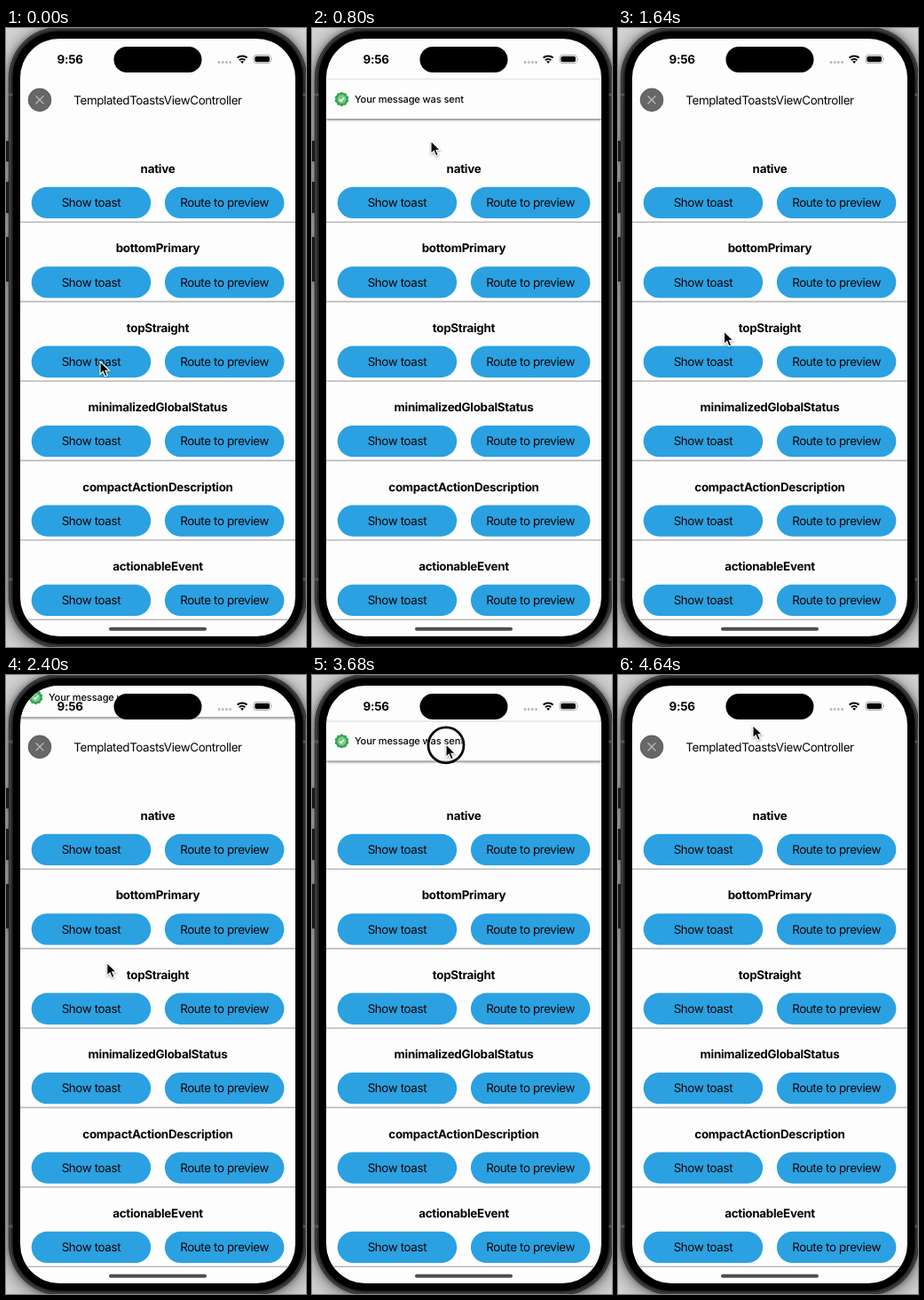
Animation of 338 by 696 pixels, one loop 4680 ms. Source, as an HTML page:

```html
<!DOCTYPE html>
<html lang="en">
<head>
<meta charset="utf-8">
<title>Toast demo</title>
<style>
html, body { margin: 0; width: 100%; height: 100%; overflow: hidden; background: #d4d4d4; }
svg { display: block; width: 338px; height: 696px; }
text { font: 13.4px Inter, sans-serif; letter-spacing: -.029em; fill: #050505; text-rendering: geometricPrecision; }
.mid { text-anchor: middle; }
.bold { font-weight: 700; letter-spacing: -.02em; }
#toast text { font-size: 11.05px; font-weight: 500; letter-spacing: -.01em; }
#toast .panel { filter: drop-shadow(0 1.4px 1.4px rgba(0, 0, 0, .66)); }
.phone { filter: drop-shadow(0 0 3px rgba(0, 0, 0, .45)) drop-shadow(0 3px 11px rgba(0, 0, 0, .5)); }
</style>
</head>
<body>
<svg viewBox="0 0 338 696">
  <defs>
    <clipPath id="screen"><rect x="16" y="12" width="310" height="672" rx="44"/></clipPath>
  </defs>

  <g class="phone">
    <path d="M0 127h5v23h-5zM0 173h5v35h-5zM0 235h5v50h-5z" fill="#1b1b1c"/>
    <rect x="3" y="-1" width="336" height="698" rx="57" fill="#2b2b2d"/>
  </g>
  <rect x="4.5" y=".5" width="333" height="695" rx="55" fill="none" stroke="#4c4d4f"/>
  <path d="M3 75h5M334 75h4M3 620h5M334 620h4" stroke="#555" stroke-width="3"/>
  <rect x="7.5" y="3.5" width="327" height="689" rx="52" fill="#000"/>

  <g clip-path="url(#screen)">
    <rect x="16" y="12" width="310" height="672" fill="#fdfdfd"/>
    <circle cx="38" cy="80.8" r="12.8" fill="#676767" stroke="#585858"/>
    <path d="M33.9 76.7l8.2 8.2m0-8.2l-8.2 8.2" stroke="#c4c4c4" stroke-width="1.2" stroke-linecap="round"/>
    <text class="mid" x="171" y="85.7">TemplatedToastsViewController</text>
    <g id="rows"></g>
    <rect x="116" y="673.8" width="110" height="4" rx="2" fill="#4e4e4e"/>

    <g id="toast">
      <rect class="panel" x="16" y="58" width="310" height="44" fill="#fdfdfd"/>
      <path id="seal" fill="#37a550"/>
      <circle cx="33.5" cy="80" r="4.9" fill="#7cca8b"/>
      <path d="M31 80.2l1.9 1.9 3.3-3.9" fill="none" stroke="#fff" stroke-width="1.4"/>
      <text x="48" y="84">Your message was sent</text>
    </g>

    <text class="bold" x="57.6" y="39.8">9:56</text>
    <rect x="121.5" y="21" width="99" height="29" rx="14.5" fill="#000"/>
    <path d="M240 38.5h14" stroke="#b9b9b9" stroke-width="3" stroke-linecap="round" stroke-dasharray="0 4.2"/>
    <g fill="none" stroke="#050505" stroke-width="2">
      <path d="M260.6 33.6a8 8 0 0 1 11 0M262.9 36.2a4.8 4.8 0 0 1 6.4 0"/>
      <path d="M266.1 39.9l-1.9-2.1a2.8 2.8 0 0 1 3.8 0z" fill="#050505" stroke="none"/>
    </g>
    <rect x="279" y="30.3" width="19.4" height="9.4" rx="3" fill="none" stroke="#a5a5a5" stroke-width=".9"/>
    <rect x="280.4" y="31.7" width="16.6" height="6.6" rx="1.8" fill="#050505"/>
    <path d="M299.5 33.5q1.6 1.5 0 3z" fill="#a5a5a5"/>
  </g>

  <g id="cursor">
    <g id="ring" fill="none">
      <circle r="20" stroke="#fff" stroke-opacity=".7" stroke-width="4"/>
      <circle r="20" stroke="#050505" stroke-width="2.8"/>
    </g>
    <path d="M0-1v14.4l3.3-3.1 2.3 5.5 2.7-1.1-2.3-5.4h4.6z" fill="#050505" stroke="#fff" stroke-width="1.1"
      style="filter:drop-shadow(0 1px 1px rgba(0,0,0,.35))"/>
  </g>
</svg>
<script>
const LOOP = 4680;
const $ = id => document.getElementById(id);

const names = ['native', 'bottomPrimary', 'topStraight', 'minimalizedGlobalStatus',
  'compactActionDescription', 'actionableEvent'];
const button = (x, label) =>
  `<rect x="${x}" y="178.8" width="134.5" height="35.3" rx="17.6" fill="#2ba1e1"/>
   <text class="mid" x="${x + 67.2}" y="201.3">${label}</text>`;
$('rows').innerHTML = names.map((name, i) =>
  `<g transform="translate(0 ${i * 89.4})">
    <text class="mid bold" x="171" y="163">${name}</text>
    ${button(28.7, 'Show toast')}${button(178.9, 'Route to preview')}
    <path d="M16 218.2h310" stroke="#b9b9bb" stroke-width="1.6"/>
  </g>`).join('');

// Scalloped badge outline
$('seal').setAttribute('d', 'M' + Array.from({ length: 72 }, (_, i) => {
  const a = i * Math.PI / 36, r = 7.6 + .5 * Math.cos(10 * a);
  return `${(33.5 + r * Math.sin(a)).toFixed(2)} ${(80 - r * Math.cos(a)).toFixed(2)}`;
}).join('L') + 'z');

const linear = p => p;
const smooth = p => p * p * (3 - 2 * p);
const easeOut = p => 1 - (1 - p) ** 3;
const easeIn = p => p * p;

// Keys are [time, value, easing towards this key]
function track(keys, t) {
  const i = keys.findIndex(k => k[0] > t);
  if (i < 0) return keys[keys.length - 1][1];
  if (i === 0) return keys[0][1];
  const [t0, a] = keys[i - 1], [t1, b, ease = smooth] = keys[i];
  return a + (b - a) * ease((t - t0) / (t1 - t0));
}

const HIDDEN = -108;
const toastY = [
  [160, HIDDEN], [560, 0, easeOut], [1240, 0], [1540, HIDDEN, easeIn],
  [2320, HIDDEN], [2720, 0, easeOut], [3460, 0], [3680, -5.5, linear],
  [4080, -19, linear], [4280, -27, linear], [4500, HIDDEN, linear]
];
const cursorX = [
  [240, 106], [760, 134], [1240, 134], [2060, 104], [2260, 104], [2740, 151], [4280, 151], [4600, 152]
];
const cursorY = [
  [240, 376], [760, 128], [1240, 128], [1760, 375], [2260, 375], [2740, 133], [2920, 133],
  [3320, 84.5], [3460, 84.5], [3680, 79, linear], [4080, 65.5, linear], [4280, 57.5, linear]
];
const presses = [[80, 200], [2120, 2260], [3440, 4280]];

function draw() {
  const t = performance.now() % LOOP;
  $('toast').setAttribute('transform', `translate(0 ${track(toastY, t)})`);
  $('cursor').setAttribute('transform', `translate(${track(cursorX, t)} ${track(cursorY, t)})`);
  $('ring').style.display = presses.some(([from, to]) => t >= from && t < to) ? '' : 'none';
  requestAnimationFrame(draw);
}
draw();
</script>
</body>
</html>
```
